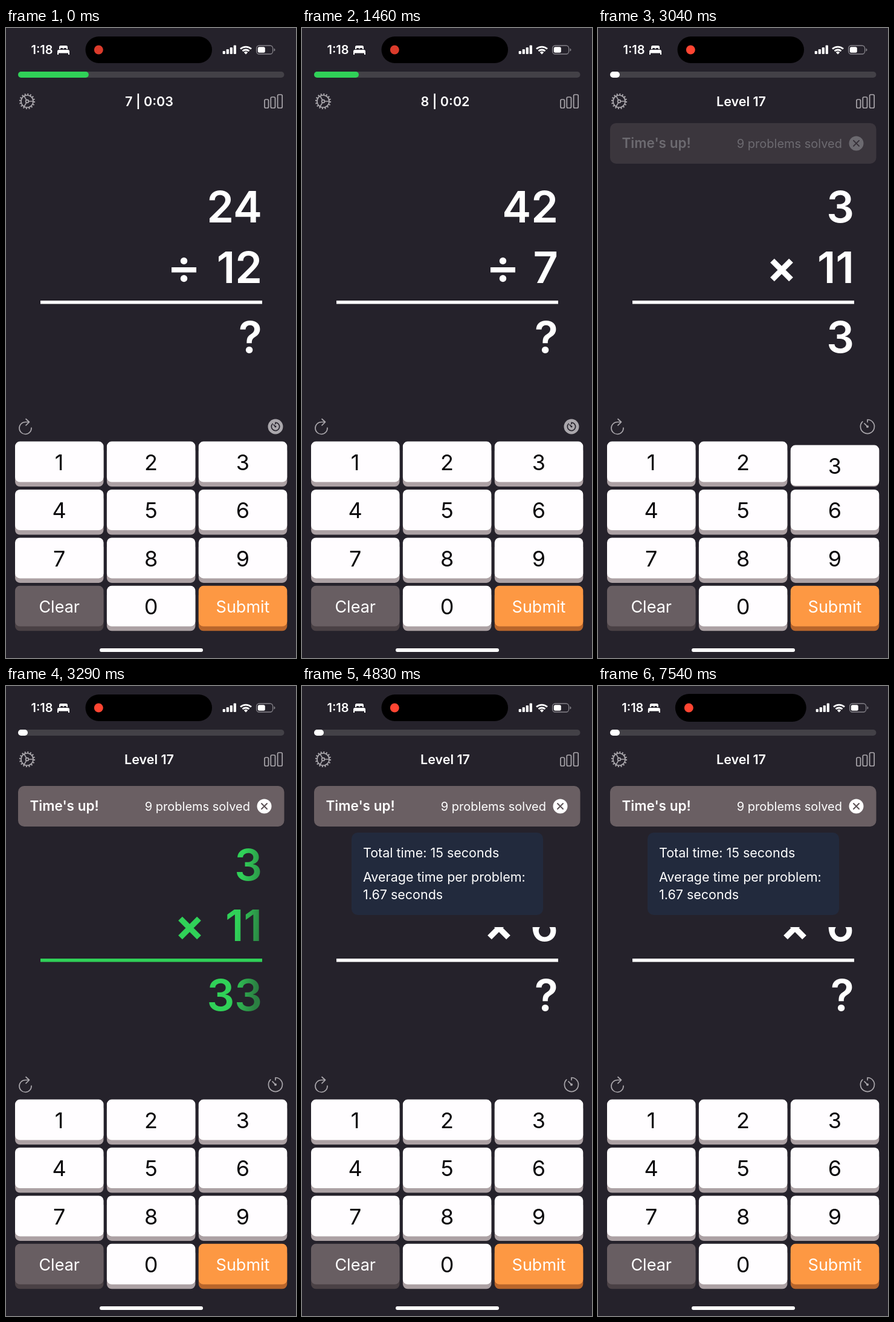
These frames come from a looping animation (480x1040 px, 7.58 s). An HTML page:

```html
<!DOCTYPE html>
<html lang="en">
<head>
<meta charset="utf-8">
<title>Mental arithmetic</title>
<style>
  html, body { margin: 0; width: 100%; height: 100%; overflow: hidden; background: #25222b; }
  svg { display: block; width: 100vw; height: 100vh; font-family: Inter, Roboto, sans-serif; fill: #fff; }
  .icon { fill: none; stroke: #aaa7ac; stroke-width: 1.7; stroke-linecap: round; stroke-linejoin: round; }
  .bold { font-weight: 600; }
  .mid { text-anchor: middle; }
  .sum { font-size: 72px; font-weight: 600; text-anchor: end; }
  .info { font-size: 21.5px; }
</style>
</head>
<body>
<svg viewBox="0 0 480 1040">
  <defs>
    <linearGradient id="shine" gradientUnits="userSpaceOnUse" x1="382" y1="400" x2="424" y2="404">
      <stop offset="0" stop-color="#30d158"/>
      <stop offset="1" stop-color="#2b7f42"/>
    </linearGradient>
  </defs>
  <rect width="480" height="1040" fill="#25222b"/>

  <!-- problem -->
  <g id="sum" class="sum">
    <text id="top" x="424" y="321"/>
    <text id="bottom" x="424" y="421"/>
    <g id="divide">
      <rect x="-20.5" y="-4.5" width="41" height="8.5"/>
      <circle cy="-15" r="5.7"/><circle cy="14" r="5.7"/>
    </g>
    <path id="times" d="M-15.5-15.5 15.5 15.5M15.5-15.5-15.5 15.5" stroke-width="9.5" fill="none"/>
    <text id="answer" x="424" y="536"/>
  </g>
  <rect id="line" x="57" y="450" width="367" height="5.5"/>

  <!-- result -->
  <rect id="cover" y="232" width="480" fill="#25222b"/>
  <g id="details" class="info">
    <rect x="82" y="242" width="317" height="136" rx="10" fill="#222a3d"/>
    <text x="101" y="283">Total time: 15 seconds</text>
    <text x="101" y="323">Average time per problem:</text>
    <text x="101" y="352">1.67 seconds</text>
  </g>
  <g id="banner">
    <rect x="20" y="165" width="440.5" height="67" rx="10" fill="#6a5f63"/>
    <text class="bold" x="39.5" y="206" font-size="22.5">Time's up!</text>
    <text x="404" y="206" font-size="20" text-anchor="end">9 problems solved</text>
    <circle cx="427.5" cy="198.5" r="12"/>
    <path d="M423 194l9 9m0-9-9 9" stroke="#5c5256" stroke-width="2" stroke-linecap="round"/>
  </g>

  <!-- header -->
  <rect x="20" y="72" width="440.5" height="10" rx="5" fill="#434147"/>
  <rect id="progress" x="20" y="72" height="10" rx="5"/>
  <text id="title" class="bold mid" x="237" y="129" font-size="21.5"/>
  <g class="icon">
    <g transform="translate(35 121)">
      <circle r="10"/>
      <circle r="11.8" stroke-width="2.6" stroke-dasharray="2 2.63" stroke-linecap="butt"/>
      <circle r="2.4"/>
      <path d="M2.4 0H10M-1.2-2.1-5-8.7M-1.2 2.1-5 8.7"/>
    </g>
    <rect x="428" y="118" width="6.5" height="14" rx="2"/>
    <rect x="438.3" y="114" width="7.2" height="18" rx="2"/>
    <rect x="449.6" y="110" width="7.6" height="22" rx="2"/>
    <path d="M42 660A10 10 0 1 1 32 650.5H38M33 645.5l5.5 5-5.5 5.3"/>
  </g>
  <circle id="disc" cx="446" cy="658" r="12.5" fill="#aaa7ac"/>
  <g id="timer" class="icon">
    <path d="M0-11.5A11.5 11.5 0 1 1-8.2-8.1M0-11.5V-7.5M0 0-5-5.2"/>
    <circle r="1.2"/>
  </g>

  <!-- keypad -->
  <g id="keys" class="mid"></g>

  <!-- status bar -->
  <rect id="island" fill="#000"/>
  <circle id="dot" cy="36" r="7.5" fill="#ff4532"/>
  <g id="left">
    <text class="bold" x="41.5" y="43" font-size="20">1:18</text>
    <path d="M88 35V31.500Q88 29 90.500 29H99.500Q102 29 102 31.500V35H100V34Q100 33 99 33H96.500Q95.500 33 95.500 34V35H94.500V34Q94.500 33 93.500 33H91Q90 33 90 34V35ZM85 44V38.500Q85 36 87.500 36H102.500Q105 36 105 38.500V44H103V41.500H87V44Z"/>
  </g>
  <g id="right">
    <rect x="358.700" y="38" width="4.200" height="5" rx="1"/>
    <rect x="364.700" y="35" width="4.200" height="8" rx="1"/>
    <rect x="370.700" y="32" width="4.200" height="11" rx="1"/>
    <rect x="376.700" y="28.500" width="4.200" height="14.500" rx="1"/>
    <path d="M388 34.500A13.500 13.500 0 0 1 406 34.500M391.500 38A8.500 8.500 0 0 1 402.500 38" fill="none" stroke="#fff" stroke-width="2.800"/>
    <path d="M393.800 40.200A5 5 0 0 1 400.200 40.200L397 43.500Z"/>
    <rect x="414.600" y="29" width="27" height="14" rx="4.500" fill="none" stroke="#85838a" stroke-width="1.300"/>
    <rect x="416.800" y="31.200" width="12" height="9.600" rx="2.500"/>
    <path d="M443.500 33.500Q445.500 34 445.500 36T443.500 38.500Z" fill="#85838a"/>
  </g>
  <rect x="155" y="1024" width="171" height="6" rx="3"/>
</svg>
<script>
const LOOP = 7580, TIME_UP = 2980, GREEN = '#30d158';
const $ = id => document.getElementById(id);
const set = (id, attrs) => {
  for (const name in attrs) $(id).setAttribute(name, attrs[name]);
};
const write = (id, text) => {
  if ($(id).textContent !== text) $(id).textContent = text;
};
const ramp = (t, start, length) => Math.min(1, Math.max(0, (t - start) / length));
const ease = p => p * p * (3 - 2 * p);

const problems = [
  { start: 0, solved: 250, top: '24', op: 'divide', opX: 294.5, bottom: '12', result: '2' },
  { start: 750, solved: 1720, top: '42', op: 'divide', opX: 332.5, bottom: '7', result: '6' },
  { start: 2230, solved: 3050, top: '3', op: 'times', opX: 304, bottom: '11', result: '33' },
  { start: 3560, solved: Infinity, top: '7', op: 'times', opX: 326, bottom: '6', result: '' }
];
const FIRST_DIGIT = 2660;
const presses = [['2', 200], ['6', 1670], ['3', 2610], ['3', 3000]];

const colors = { Clear: ['#685e62', '#4a4145'], Submit: ['#fd9843', '#b8652b'] };
const labels = ['1', '2', '3', '4', '5', '6', '7', '8', '9', 'Clear', '0', 'Submit'];
$('keys').innerHTML = labels.map((label, i) => {
  const x = 15 + i % 3 * 151.9, y = 682.6 + Math.floor(i / 3) * 79.4;
  const [face, edge] = colors[label] || ['#fffdff', '#aca1a4'];
  const word = label.length > 1;
  return `<g transform="translate(${x} ${y})">
    <rect y="8" width="146.5" height="66.500" rx="8" fill="${edge}"/>
    <g id="key${label}"><rect width="146.5" height="67" rx="8" fill="${face}"/>
    <text x="73.2" y="${word ? 82.4 - 38 - .2 : 47.2}" font-size="${word ? 27 : 36}"
      fill="${word ? '#fff' : '#0b0a0c'}">${label}</text></g></g>`;
}).join('');

function drawProblem(t) {
  const p = problems.findLast(item => t >= item.start);
  const solved = t >= p.solved;
  const paint = solved ? 'url(#shine)' : '#fff';
  write('top', p.top);
  write('bottom', p.bottom);
  const typing = p.bottom === '11' && t >= FIRST_DIGIT;
  write('answer', solved ? p.result : typing ? '3' : '?');
  for (const op of ['divide', 'times'])
    set(op, { display: op === p.op ? 'inline' : 'none', transform: `translate(${p.opX} 399.5)` });
  set('sum', { fill: paint });
  set('times', { stroke: solved ? GREEN : '#fff' });
  set('line', { fill: solved ? GREEN : '#fff' });
  if (solved) {
    const shift = (t - p.solved - 240) * .15;
    set('shine', { gradientTransform: `translate(${shift} 0)` });
  }
}

function drawTimer(t) {
  const running = t < TIME_UP;
  const left = 3.98 - t / 1000;
  const count = 7 + problems.filter(p => t >= p.solved).length;
  write('title', running ? `${count} | 0:0${Math.floor(left)}` : 'Level 17');
  set('progress', { width: running ? left / 15 * 440.5 : 16, fill: running ? GREEN : '#fff' });
  set('disc', { opacity: running ? 1 : 0 });
  set('timer', {
    transform: `translate(446 658) scale(${running ? .58 : 1})`,
    style: running ? 'stroke:#25222b;stroke-width:2.8' : ''
  });
}

function drawResult(t) {
  const shown = ease(ramp(t, TIME_UP, 160));
  const open = ease(ramp(t, 4150, 240));
  set('banner', { opacity: shown, transform: `translate(0 ${-12 * (1 - shown)})` });
  set('details', { opacity: open, transform: `translate(0 ${-10 * (1 - open)})` });
  set('cover', { height: 166 * open });
}

function drawStatus(t) {
  const grow = ease(ramp(t, 7360, 180));
  set('island', {
    x: 131.5 - 3.7 * grow, y: 14 - grow, rx: 22 + grow,
    width: 209.5 + 7.4 * grow, height: 44 + 2 * grow
  });
  set('left', { transform: `translate(${-2.2 * grow} 0)` });
  set('right', { transform: `translate(${2 * grow} 0)` });
  const dim = t < 2200 ? .07 * (1 + Math.cos(t / 1460 * 2 * Math.PI)) : 0;
  set('dot', { cx: 153.3 - 3 * grow, opacity: 1 - dim });
}

function drawKeys(t) {
  for (const label of ['2', '3', '6']) {
    const down = presses.some(([key, at]) => key === label && t >= at && t < at + 120);
    set('key' + label, { transform: `translate(0 ${down ? 6 : 0})` });
  }
}

const begin = performance.now();
function frame() {
  const t = (performance.now() - begin) % LOOP;
  for (const draw of [drawProblem, drawTimer, drawResult, drawStatus, drawKeys]) draw(t);
  requestAnimationFrame(frame);
}
frame();
</script>
</body>
</html>
```
